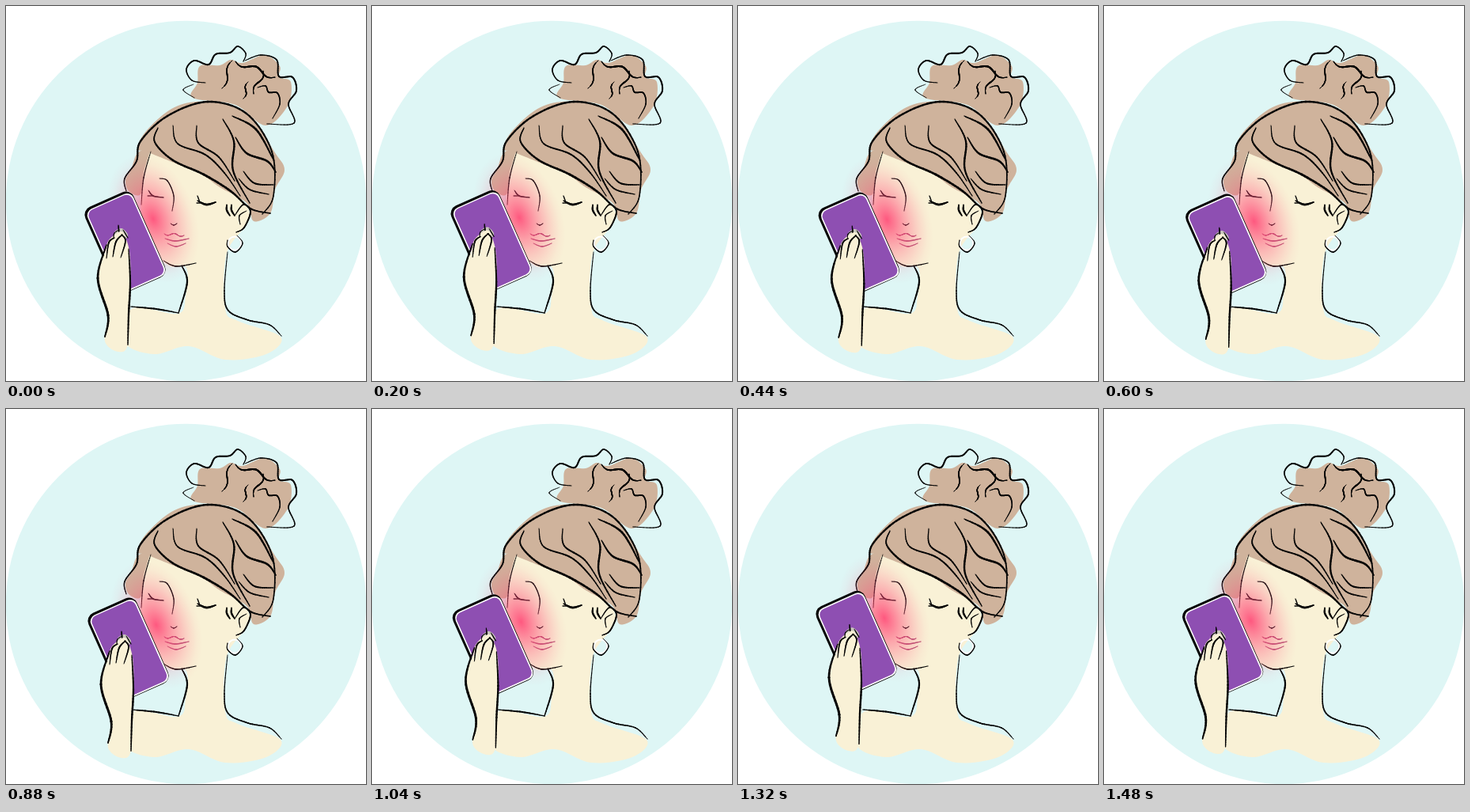
An HTML page with a canvas for the animation above (1.6 s loop, 455 by 474 pixels).

```html
<!DOCTYPE html>
<html lang="en">
<head>
<meta charset="utf-8">
<title>Cheek massage</title>
<style>
html, body { margin: 0; width: 100%; height: 100%; overflow: hidden; background: #fff; }
canvas { display: block; width: 455px; height: 474px; }
</style>
</head>
<body>
<canvas id="stage" width="455" height="474"></canvas>
<script>
const ctx = document.getElementById('stage').getContext('2d');
const LOOP = 1600, HOLD = 120, TRAVEL = 600;
const SKIN = '#f9f1d6', HAIR = '#cfb39c', INK = '#050505', SKY = '#def6f5', ROSE = '#b55274';

// Out to (4, 4) on a shallow arc, back on a wide swing up and left
function massage(t) {
  const back = t >= LOOP / 2;
  const u = Math.max(0, Math.min(1, (t % (LOOP / 2) - HOLD) / TRAVEL));
  const ease = u < 0.5 ? 2 * u * u : 1 - 2 * (1 - u) ** 2;
  const along = 4 * (back ? 1 - ease : ease);
  if (!back) return [along, along - 1.8 * Math.sin(Math.PI * Math.sqrt(u))];
  const swing = Math.sin(Math.PI * u);
  return [along - 2.2 * swing, along - 6.4 * swing];
}

// Catmull-Rom samples through x, y pairs
function smooth(flat, closed) {
  const n = flat.length / 2, out = [];
  const at = (i, c) => flat[2 * (closed ? (i + n) % n : Math.max(0, Math.min(n - 1, i))) + c];
  for (let i = 0; i < (closed ? n : n - 1); i++) {
    for (let u = 0; u < 1; u += 0.1) {
      out.push([0, 1].map(c => {
        const [a, b, d, e] = [at(i - 1, c), at(i, c), at(i + 1, c), at(i + 2, c)];
        return b + 0.5 * u * (d - a + u * (2 * a - 5 * b + 4 * d - e + u * (3 * (b - d) + e - a)));
      }));
    }
  }
  out.push([at(closed ? 0 : n - 1, 0), at(closed ? 0 : n - 1, 1)]);
  return out;
}

function fill(color, ...flat) {
  ctx.fillStyle = color;
  ctx.beginPath();
  smooth(flat, true).forEach(p => ctx.lineTo(...p));
  ctx.fill();
}

// Brush line, widest in the middle
function ink(width, color, ...flat) {
  const pts = smooth(flat, false);
  ctx.strokeStyle = color;
  ctx.lineCap = 'round';
  for (let i = 1; i < pts.length; i++) {
    ctx.lineWidth = width * (0.45 + 0.55 * Math.sin(Math.PI * i / pts.length));
    ctx.beginPath();
    ctx.moveTo(...pts[i - 1]);
    ctx.lineTo(...pts[i]);
    ctx.stroke();
  }
}

// Sine wave laid along the line from one point to another
function wave(x0, y0, x1, y1, amp, turns) {
  const dx = x1 - x0, dy = y1 - y0, len = Math.hypot(dx, dy), steps = 12, flat = [];
  for (let i = 0; i <= steps; i++) {
    const u = i / steps, s = amp * Math.sin(2 * Math.PI * turns * u) / len;
    flat.push(x0 + dx * u - dy * s, y0 + dy * u + dx * s);
  }
  return flat;
}

function drawBackdrop() {
  ctx.fillStyle = '#fff';
  ctx.fillRect(0, 0, 455, 474);
  ctx.fillStyle = SKY;
  ctx.beginPath();
  ctx.arc(227.5, 246.5, 227.7, 0, 7);
  ctx.fill();
}

function drawBun() {
  fill(HAIR, 245, 76, 270, 75, 284, 68, 299, 72, 327, 62, 346, 76, 345, 90, 360, 96, 356, 126,
    328, 151, 290, 125, 236, 116, 242, 97);
  ink(2, INK, 252, 97, 235, 94, 228, 80, 238, 69, 256, 74, 265, 61, 283, 59, 293, 51, 303, 60, 300, 70);
  ink(2, INK, 302, 69, 322, 62, 342, 68, 345, 89, 362, 90, 367, 107, 357, 124, 364, 148, 330, 149);
  ink(1, INK, 237, 99, 224, 106, 238, 116);
  ink(2.2, INK, ...wave(290, 70, 340, 90, 3.5, 1.5));
  ink(1.6, INK, ...wave(286, 69, 273, 104, 3, 1));
  ink(1.5, INK, ...wave(306, 96, 300, 117, 2, 1));
  ink(1.7, INK, ...wave(325, 82, 313, 111, -3, 1));
  ink(1.8, INK, 318, 103, 328, 101, 332, 109, 343, 110, 346, 124, 337, 142);
}

function drawBody() {
  fill(SKIN, 184, 182, 170, 236, 180, 299, 206, 328, 228, 331, 227, 366, 217, 389, 160, 382, 150, 425,
    187, 440, 231, 430, 277, 447, 329, 440, 347, 418, 293, 398, 277, 382, 279, 312, 308, 262, 260, 215);
  ink(2.2, INK, 222, 328, 229, 349, 218, 388);
  ink(2, INK, 218, 388, 190, 383, 158, 380);
  ink(1.8, INK, 280, 311, 276, 360, 281, 385, 306, 397, 333, 403, 348, 417);
  ink(1.4, INK, 199, 322, 215, 329, 240, 325);
}

function drawHair() {
  fill(HAIR, 181, 183, 166, 186, 158, 207, 151, 220, 155, 234, 170, 238, 174, 210);
  fill(HAIR, 177, 184, 166, 180, 178, 157, 213, 128, 255, 121, 306, 136, 339, 184, 352, 207,
    340, 232, 334, 262, 313, 272, 304, 249, 270, 229, 247, 213, 207, 196);
  ink(2.4, INK, 152, 234, 150, 218, 165, 196, 170, 171, 204, 139, 255, 121, 304, 136, 336, 184, 338, 240, 324, 263);
  ink(2.7, INK, 192, 154, 188, 172, 211, 195, 250, 213, 284, 234, 309, 256, 334, 262);
  ink(2, INK, 211, 151, 217, 174, 252, 188, 276, 211, 296, 240);
  ink(2, INK, 241, 151, 243, 173, 269, 191, 289, 221);
  ink(2.4, INK, 274, 143, 288, 171, 287, 208, 308, 249);
  ink(2.6, INK, 286, 139, 316, 156, 338, 194);
  ink(2.6, INK, 290, 166, 304, 186, 330, 196, 341, 210);
  ink(2, INK, 300, 209, 314, 224, 338, 226);
  ink(1.8, INK, 294, 218, 308, 232, 332, 238);
  ink(1.3, INK, 183, 184, 174, 217, 171, 251);
}

function drawFace() {
  ink(1.3, INK, 194, 218, 204, 221, 212, 240, 210, 259);
  ink(1.6, INK, 180, 233, 186, 240, 199, 242);
  ink(1, INK, 185, 240, 179, 240);
  ink(1, INK, 208, 275, 212, 277, 216, 275);
  ink(2.6, INK, 242, 246, 253, 251, 265, 248);
  ink(1.2, INK, 245, 248, 242, 240);
  ink(1.2, INK, 249, 249, 241, 249);
  ink(1.1, ROSE, ...wave(200, 288, 225, 290, 1.5, 1.5));
  ink(1.6, ROSE, 201, 294, 214, 297, 231, 294);
  ink(1.3, ROSE, 204, 300, 215, 304, 227, 300);

  fill(SKIN, 291, 262, 302, 251, 307, 270, 291, 286);
  ink(2, INK, 289, 265, 300, 251, 309, 260, 301, 280, 291, 286);
  ink(1.3, INK, 304, 259, 295, 265, 296, 276);
  for (const x of [279, 285]) ink(2.2, INK, x, 251, x, 258, x + 4, 265);
  ctx.strokeStyle = '#fff';
  ctx.lineWidth = 2;
  ctx.beginPath();
  ctx.arc(289, 300, 8.5, 0, 7);
  ctx.stroke();
  ink(1.4, INK, 292, 290, 299, 300, 290, 311, 280, 304, 280, 296);
}

function drawGlow() {
  const glow = ctx.createRadialGradient(0, 0, 0, 0, 0, 1);
  for (let r = 0; r <= 1; r += 0.125) {
    glow.addColorStop(r, `rgba(255,72,118,${0.9 * (1 - r) ** 1.5})`);
  }
  ctx.save();
  ctx.translate(186, 269);
  ctx.rotate(-0.35);
  ctx.scale(54, 84);
  ctx.fillStyle = glow;
  ctx.fillRect(-1, -1, 2, 2);
  ctx.restore();
}

function drawPhone() {
  const plate = (color, x, y, w, h, r) => {
    ctx.fillStyle = color;
    ctx.beginPath();
    ctx.roundRect(x, y, w, h, r);
    ctx.fill();
  };
  ctx.save();
  ctx.translate(150.5, 298.5);
  ctx.rotate(-0.42);
  plate(INK, -33.5, -59, 67, 118, 11);
  plate('#fff', -30.5, -56, 63.2, 114.2, 9);
  plate('#8e4fb2', -29, -54.5, 60, 111, 8);
  ctx.restore();
  fill('#c9c6bd', 137, 287, 146, 281, 154, 290, 145, 298);
  ink(1.6, INK, 142, 277, 143, 288);
  ink(1.2, INK, 148, 283, 154, 293);
}

function drawHand() {
  fill(SKIN, 130, 296, 145, 285, 152, 295, 157, 320, 157, 375, 154, 428, 142, 437, 125, 424,
    128, 390, 116, 343, 125, 312);
  ink(3, INK, 127, 302, 116, 344, 129, 391, 125, 418);
  ink(2.4, INK, 155, 307, 157, 350, 155, 390, 154, 428);
  ink(1.8, INK, 127, 319, 130, 299, 137, 293);
  ink(1.9, INK, 135, 317, 139, 298, 147, 289);
  ink(1.8, INK, 145, 318, 151, 297, 146, 289);
  ink(1, INK, 136, 293, 137, 287, 143, 283);
}

function draw(t) {
  drawBackdrop();
  drawBun();
  drawBody();
  drawHair();
  drawFace();
  ctx.save();
  ctx.translate(...massage(t));
  drawGlow();
  drawPhone();
  drawHand();
  ctx.restore();
}

const start = performance.now();
function tick() {
  draw((performance.now() - start) % LOOP);
  requestAnimationFrame(tick);
}
tick();
</script>
</body>
</html>
```
